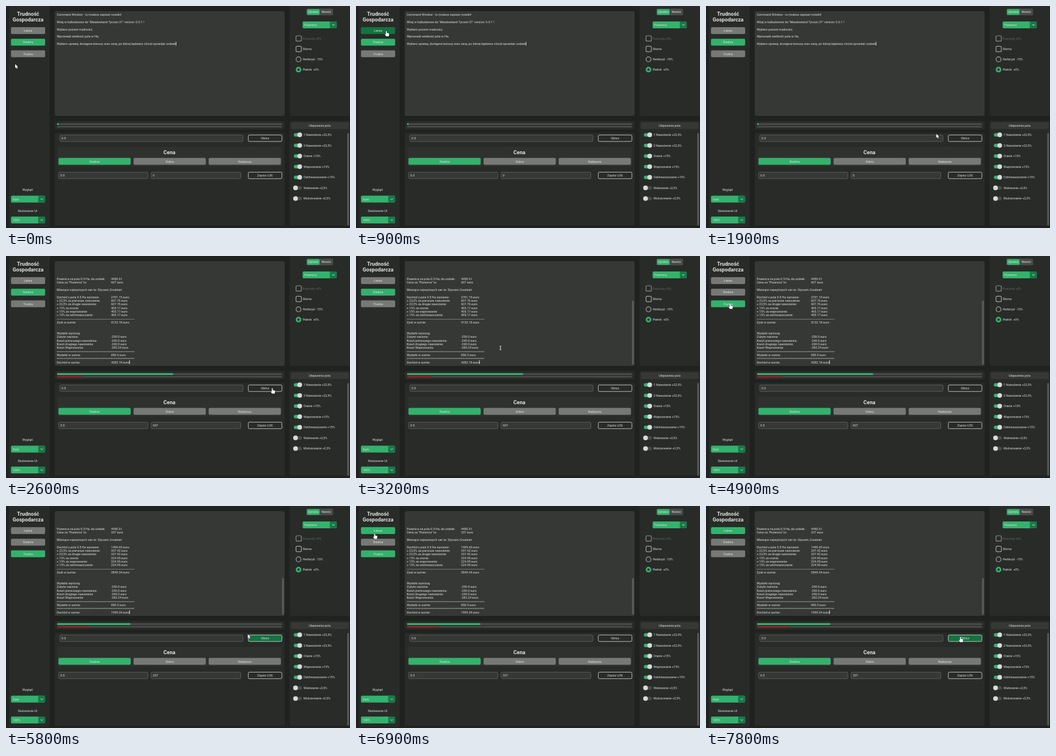
Animation, 600 px wide and 388 px high, one loop 8 s. Source, as an HTML page with a canvas:

```html
<!DOCTYPE html>
<html lang="pl">
<head>
<meta charset="utf-8">
<title>Kalkulator</title>
<style>
html, body { margin: 0; width: 600px; height: 388px; overflow: hidden; background: #202220; }
canvas { display: block; }
</style>
</head>
<body>
<canvas id="stage" width="600" height="388"></canvas>
<script>
const ctx = document.getElementById('stage').getContext('2d');
const LOOP = 8000, STEP = 100, LINE = 6.32;
const C = {
  gutter: '#202220', panel: '#292b29', box: '#363836', inner: '#2f312f', track: '#484b49',
  green: '#33b26c', dark: '#14733f', arrow: '#167a47', gray: '#777977', red: '#8c2029',
  line: '#646864', text: '#dfe3e0', dim: '#656865', white: '#e2e4e2', bar: '#5a5d5a'
};
const BODY = '5.37px Roboto, sans-serif', TITLE = 'bold 9.15px Roboto, sans-serif';

function rect(x, y, w, h, fill, r = 0, stroke, lw = 0.8) {
  ctx.beginPath();
  ctx.roundRect(x, y, w, h, r);
  if (fill) { ctx.fillStyle = fill; ctx.fill(); }
  if (stroke) { ctx.strokeStyle = stroke; ctx.lineWidth = lw; ctx.stroke(); }
}
function circle(x, y, r, fill, stroke, lw) {
  ctx.beginPath();
  ctx.arc(x, y, r, 0, 7);
  if (fill) { ctx.fillStyle = fill; ctx.fill(); }
  if (stroke) { ctx.strokeStyle = stroke; ctx.lineWidth = lw; ctx.stroke(); }
}
// y is the middle of the capitals
function text(s, x, y, align = 'left', font = BODY, color = C.text) {
  ctx.font = font;
  ctx.textAlign = align;
  ctx.fillStyle = color;
  ctx.fillText(s, x, y + (font === TITLE ? 3.3 : 1.95));
}
const label = (s, x, y, font) => text(s, x, y, 'center', font);

function button(b, fill, border) {
  rect(b.x, b.y, b.w, b.h, fill, 2, border);
  label(b.name, b.x + b.w / 2, b.y + b.h / 2);
}
function entry(x, y, w, value) {
  rect(x, y, w, 11.4, C.box, 2, C.line);
  text(value, x + 3, y + 5.7);
}
function dropdown(x, y, value) {
  rect(x, y, 59.5, 12, C.green, 2);
  rect(x + 47.5, y, 12, 12, C.arrow, [0, 2, 2, 0]);
  text(value, x + 3, y + 6);
  ctx.beginPath();
  ctx.moveTo(x + 51.5, y + 5);
  ctx.lineTo(x + 53.7, y + 7.1);
  ctx.lineTo(x + 55.9, y + 5);
  ctx.strokeStyle = C.white;
  ctx.lineWidth = 1;
  ctx.stroke();
}

const levels = ['Łatwa', 'Średnia', 'Trudna'].map((name, i) =>
  ({ name, x: 8.7, y: 37 + i * 20.3, w: 59.6, h: 12 }));
const calcButton = { name: 'Oblicz', x: 422.6, y: 225.4, w: 58.6, h: 11.4 };
const logButton = { name: 'Zapisz LOG', x: 422.6, y: 290.4, w: 58.6, h: 11.4 };
const buttons = [...levels, calcButton];

// time, x, y of the pointer
const path = [
  [0, 16, 101.5], [100, 16, 101.5], [400, 28, 84], [600, 42, 64], [800, 53, 43.5], [1000, 53, 43.5],
  [1300, 56, 66], [1500, 110, 120], [1800, 390, 222], [2200, 464.5, 231], [2700, 464.5, 231],
  [3300, 235, 155], [3800, 199, 173], [4200, 199, 173], [4300, 170, 160], [4600, 42, 83], [4900, 42, 83],
  [5400, 441, 230], [5600, 441, 230], [5800, 421.7, 224], [6200, 240, 150], [6500, 75, 75],
  [6800, 32.5, 48], [7000, 32.5, 48], [7400, 440, 229], [7700, 443.7, 228.5], [8000, 443.7, 228.5]
];
function pointerAt(t) {
  const i = Math.max(1, path.findIndex(p => p[0] >= t));
  const [t0, x0, y0] = path[i - 1], [t1, x1, y1] = path[i];
  const k = Math.max(0, Math.min(1, (t - t0) / (t1 - t0)));
  const e = k * k * (3 - 2 * k);
  return { x: x0 + (x1 - x0) * e, y: y0 + (y1 - y0) * e };
}
const inside = (p, b) => p.x >= b.x && p.x <= b.x + b.w && p.y >= b.y && p.y <= b.y + b.h;

const clicks = [2500, 4800, 5500, 6900];
const caretOff = [600, 1500, 2800, 3700, 4600, 6000, 6900];
const within = (t, starts, span) => starts.some(s => t >= s && t < s + span);

const intro = [
  'Command Window - tu możesz zapisać notatki!',
  'Witaj w kalkulatorze do "Meadowland Tycoon 31" version: 0.0.1 !',
  'Wybierz poziom trudności,',
  'Wprowadź wielkość pola w Ha,',
  'Wybierz uprawę, dostępne bonusy oraz cenę, po której będziesz chciał sprzedać urobek'
];
const round = n => +n.toFixed(2);

function reportRows(price, income) {
  const big = round(income * 0.225), small = round(income * 0.15);
  const gain = round(income + 2 * big + 3 * small);
  const euro = n => n.toFixed(2) + ' euro';
  return [
    ['Pszenica na polu 0.5 Ha, da urobek:', '4450.0 l'],
    ['Cena za "Pszenica" to:', price + ' euro'],
    [],
    ['Miesiące najwyższych cen to: Styczeń, Grudzień'],
    [],
    ['Dochód z pola 0.5 Ha wyniesie:', euro(income)],
    ['+ 22,5% za pierwsze nawożenie:', euro(big)],
    ['+ 22,5% za drugie nawożenie:', euro(big)],
    ['+ 15% za oranie:', euro(small)],
    ['+ 15% za wapnowanie:', euro(small)],
    ['+ 15% za odchwaszczanie:', euro(small)],
    ['-'],
    ['Zysk w sumie:', euro(gain)],
    [], [],
    ['Wydatki wyniosą:'],
    ['Zużyte nasiona:', '-250.0 euro'],
    ['Koszt pierwszego nawożenia:', '-240.0 euro'],
    ['Koszt drugiego nawożenia:', '-240.0 euro'],
    ['Koszt Wapnowania:', '-283.24 euro'],
    ['-'],
    ['Wydatki w sumie:', '850.0 euro'],
    ['='.repeat(46)],
    ['Dochód w sumie:', euro(gain - 850)]
  ];
}
const reports = { 607: reportRows(607, 2701.15), 337: reportRows(337, 1499.65) };

function drawConsole(t, price) {
  rect(85, 9, 401, 183, C.box, 3);
  let caretX, caretY;
  if (!price) {
    intro.forEach((s, i) => text(s, 88.5, 15.3 + i * 2 * LINE));
    caretX = 88.5 + ctx.measureText(intro[4]).width;
    caretY = 15.3 + 8 * LINE;
  } else {
    const rows = reports[price];
    rows.forEach(([a, b], i) => {
      const y = 40.2 + i * LINE;
      if (a === '-') rect(88.5, y + 0.2, 135.5, 0.7, '#b9bcb9');
      else if (a) text(a, 88.5, y);
      if (b) text(b, 183.3, y);
    });
    caretX = 183.3 + ctx.measureText(rows[23][1]).width;
    caretY = 40.2 + 23 * LINE;
    const top = price === 607 ? 78 : 126;
    if (t >= 2700) rect(481.4, top, 3.2, 190 - top, C.bar, 1.6);
  }
  if (!within(t, caretOff, 300)) rect(caretX + 0.2, caretY - 3.2, 0.9, 6.4, '#f4f4f4');
}

function drawProgress(price) {
  rect(85, 201, 401, 15, C.panel, 3);
  const [gain, cost] = { 0: [3, 0], 607: [202.5, 44], 337: [128, 57] }[price];
  rect(89, 204.8, 392.5, 3.3, C.track, 1.3);
  rect(89, 204.8, gain, 3.3, C.green, 1.3);
  rect(89, 209.4, 392.5, 3.1, C.track, 1.3);
  if (cost) rect(89, 209.4, cost, 3.1, C.red, 1.3);
}

function drawLeft(t, hovered) {
  rect(5, -4, 71, 390, C.panel, 3);
  label('Trudność', 38.5, 14, TITLE);
  label('Gospodarcza', 38.5, 24, TITLE);
  const chosen = [t >= 6900, t < 4900, t >= 4800 && t < 7000];
  levels.forEach((b, i) => button(b, b === hovered ? C.dark : chosen[i] ? C.green : C.gray));
  label('Wygląd:', 38, 321.5);
  dropdown(8.7, 331.6, 'Dark');
  label('Skalowanie UI:', 38, 357.7);
  dropdown(8.7, 368, '100%');
}

function drawCenter(price, hovered) {
  rect(85, 221.5, 401, 162.5, C.panel, 3);
  entry(93.8, 225.4, 319.5, '0.5');
  button(calcButton, hovered === calcButton ? C.dark : C.panel, C.white);
  rect(89.5, 246, 392, 34, C.inner, 3);
  label('Cena', 285, 255.5, TITLE);
  ['Średnia', 'Dobra', 'Najlepsza'].forEach((name, i) =>
    button({ name, x: 91.5 + i * 131, y: 265.6, w: 126, h: 12 }, i ? C.gray : C.green));
  entry(91.8, 290.4, 155.6, '0.5');
  entry(253, 290.4, 156.5, String(price));
  button(logButton, C.panel, C.white);
}

function drawRight() {
  rect(494.5, -4, 110, 196, C.panel, 3);
  rect(524, 4.5, 46.5, 11.8, C.track, 2);
  rect(525, 5.4, 22, 10, C.green, 2);
  label('Uprawa', 536, 10.4);
  label('Nawóz', 558.7, 10.4);
  dropdown(517.3, 27, 'Pszenica');

  rect(505.8, 52, 9.4, 9.4, null, 2, '#8c908c', 1.2);
  text('Pszczoły +5%', 517.5, 56.7, 'left', BODY, C.dim);
  rect(505.8, 70.4, 9.4, 9.4, null, 2, '#a2a6a2', 1.2);
  text('Słoma', 517.5, 75.2);
  circle(510.2, 93.2, 4.3, null, '#a2a6a2', 1.2);
  text('Herbicyd  -15%', 517.5, 93.2);
  circle(510.2, 111.2, 3.5, null, C.green, 2.8);
  text('Pielnik  +0%', 517.5, 111.2);

  rect(494.5, 201, 110, 183, C.panel, 3);
  rect(497, 203.3, 100.5, 11.8, C.box, 2);
  label('Ulepszenia pola', 547, 209.2);
  ['1 Nawożenie +22,5%', '2 Nawożenie +22,5%', 'Oranie +15%', 'Wapnowanie +15%',
    'Odchwaszczanie +15%', 'Wałowanie +2,5%', 'Mulczowanie +2,5%'].forEach((name, i) => {
    const y = 225.2 + i * 18.55, on = i < 5;
    rect(502, y - 3, 14, 6, on ? C.green : C.track, 3);
    circle(on ? 512.3 : 505, y, 4.1, '#d6dad8');
    text(name, 519, y);
  });
  rect(595.3, 222, 2.8, 162, C.bar, 1.4);
}

const shapes = {
  arrow: 'M0 0V7.2L1.7 5.7L2.9 8.3L4.1 7.8L3 5.2H5.2Z',
  hand: 'M-.9 .6Q0-.8 .8 .6V3.4L3.8 4.1Q5 4.5 4.8 6L4.1 9.4H-.4L-2.6 6.2Q-2.6 5-.9 6Z'
};
for (const k in shapes) shapes[k] = new Path2D(shapes[k]);

function drawPointer(p) {
  const overText = inside(p, { x: 85, y: 9, w: 395, h: 183 }) || inside(p, { x: 93.8, y: 225, w: 320, h: 12 });
  ctx.save();
  ctx.translate(p.x, p.y);
  if (overText) {
    rect(-0.5, -3.4, 1, 6.8, '#f0f0f0');
    rect(-1.5, -3.7, 3, 0.7, '#f0f0f0');
    rect(-1.5, 3, 3, 0.7, '#f0f0f0');
  } else {
    const shape = buttons.some(b => inside(p, b)) ? shapes.hand : shapes.arrow;
    ctx.fillStyle = '#fff';
    ctx.strokeStyle = '#111';
    ctx.lineWidth = 0.9;
    ctx.stroke(shape);
    ctx.fill(shape);
  }
  ctx.restore();
}

function draw(t) {
  const price = t < 2500 ? 0 : t < 5500 ? 607 : 337;
  // hover trails the pointer slightly and drops out briefly after a click
  const trail = pointerAt(Math.max(0, t - STEP));
  const hovered = within(t, clicks, 180) ? null : buttons.find(b => inside(trail, b));
  rect(0, 0, 600, 388, C.gutter);
  drawLeft(t, hovered);
  drawConsole(t, price);
  drawProgress(price);
  drawCenter(price, hovered);
  drawRight();
  drawPointer(pointerAt(t));
}

function tick() {
  draw(Math.floor(performance.now() % LOOP / STEP) * STEP);
  requestAnimationFrame(tick);
}
tick();
</script>
</body>
</html>
```
